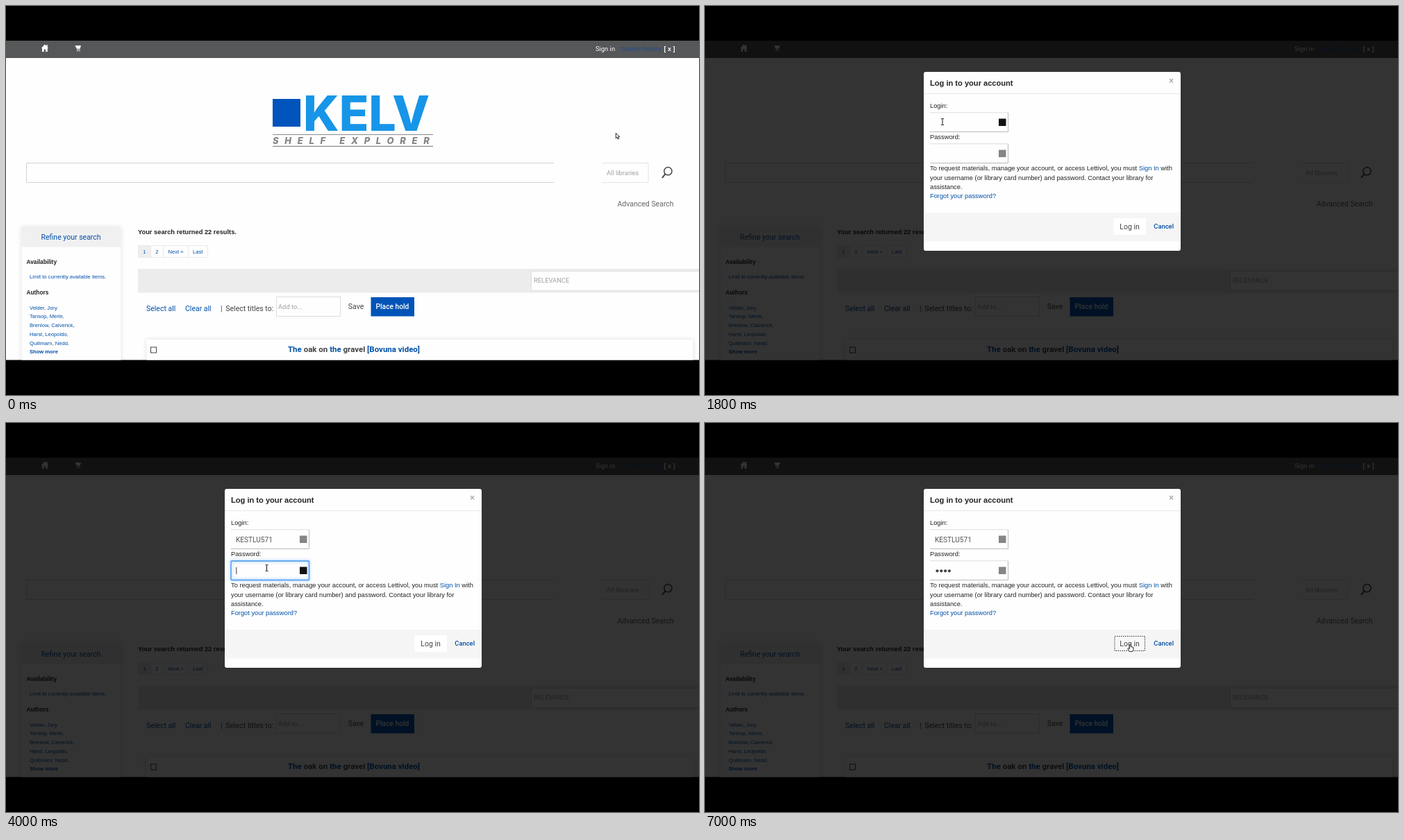
An HTML page for the animation above (8000 ms loop, 998 by 561 pixels).

```html
<!DOCTYPE html>
<html lang="en">
<head>
<meta charset="utf-8">
<title>Catalog sign-in</title>
<style>
html, body { margin: 0; width: 100%; height: 100%; overflow: hidden; background: #000; }
svg { display: block; width: 100%; height: 100%; }
text { font: 9.3px "Liberation Sans", Arial, sans-serif; fill: #222; }
.ui text, text.ui { font-family: Roboto, sans-serif; font-size: 10.5px; fill: #444; }
.b text, text.b { font-weight: 700; }
.s text { font-size: 7.6px; }
.link text, text.link, tspan.link { fill: #0050a8 !important; }
.hint text { font-size: 9.4px; fill: #a0a0a0; }
.box { fill: #fefefe; stroke: #dedede; }
.focus { fill: none; stroke: #4a9af0; stroke-width: 1.4; filter: drop-shadow(0 0 2px #66b0ff); }
.card { fill: #fefefe; filter: drop-shadow(0 0 3px #0002); }
</style>
</head>
<body>
<svg viewBox="0 0 998 561">
  <defs>
    <path id="arrow" d="M.3.3V7.8L2 6.2 3.3 9 4.6 8.5 3.4 5.8H5.8Z" fill="#fff" stroke="#111" stroke-width=".9"/>
    <path id="hand" d="M-.6 1.4Q.3.2 1.2 1.4V4.6L4.8 5.4V9.2L3.8 11.6H-.8L-3.2 7.6Q-3 6.2-1.6 7.2L-.6 8Z" fill="#fff" stroke="#111" stroke-width=".9"/>
    <path id="beam" d="M-2-4.5H-.6L0-4 .6-4.5H2M0-4V4M-2 4.5H-.6L0 4 .6 4.5H2" fill="none" stroke="#111"/>
    <path id="dash" d="M-2-4.5H2" stroke="#111" stroke-width="1.2"/>
    <clipPath id="view"><path d="M0 50H998V510.6H0Z"/></clipPath>
  </defs>
  <rect width="998" height="561"/>

  <g clip-path="url(#view)">
    <rect y="50" width="998" height="461" fill="#fefefe"/>
    <rect y="50" width="998" height="25" fill="#555759"/>
    <path d="M50.8 61 55.8 55.3 58.2 57.8V56H59.8V59.4L61.2 61H59.8V66H57V62.5H54.6V66H52V61Z" fill="#fff"/>
    <path d="M99.5 57H108L106.6 61.8H101.8Z" fill="#fff"/>
    <path d="M102 63.2H106.6M102 65H103.4M105.4 65H106.8" stroke="#fff"/>
    <text class="ui" x="849" y="64.5" style="font-size:9.4px;fill:#fff">Sign in</text>
    <text x="885" y="64.5" style="font-size:9.2px;fill:#1d4c94">Search history</text>
    <text class="b" x="947.5" y="64.5" style="font-size:9px;fill:#fff">[ x ]</text>

    <rect x="384" y="134" width="40" height="40" fill="#0054bb"/>
    <text x="428" y="180" style="font:800 70px Inter,sans-serif;fill:#1795e8">KELV</text>
    <path d="M384 185.5H615M384 202.3H615" stroke="#8a8a8a" stroke-width="1.2"/>
    <text x="384" y="198.5" style="font:italic 800 13px Inter,sans-serif;fill:#858585;letter-spacing:8.7px">SHELF EXPLORER</text>

    <path d="M789 226.5H29.5V254.5H789" fill="none" stroke="#d2d2d2"/>
    <path d="M858 226.5H925V254.5H858" fill="none" stroke="#e4e4e4"/>
    <g class="ui hint">
      <text x="865" y="244">All libraries</text>
    </g>
    <path d="M949.5 242 945 248" stroke="#444" stroke-width="2"/>
    <circle cx="953.4" cy="238.2" r="5.6" fill="none" stroke="#444" stroke-width="1.5"/>
    <text class="ui" x="880.5" y="289" style="fill:#666">Advanced Search</text>

    <rect class="card" x="22.5" y="319" width="143" height="210"/>
    <rect x="22.5" y="319" width="143" height="28.5" fill="#f0f0f1"/>
    <text class="ui link" x="50.5" y="336.8">Refine your search</text>
    <g class="b">
      <text x="29.5" y="371.8" style="font-size:8.3px">Availability</text>
      <text x="29.5" y="416" style="font-size:8.3px">Authors</text>
    </g>
    <g class="s link">
      <text x="34" y="393">Limit to currently available items.</text>
      <text x="34" y="437.5">Velder, Jory</text>
      <text x="34" y="450.2">Tansop, Merle,</text>
      <text x="34" y="463">Brenlow, Calverick,</text>
      <text x="34" y="475.8">Harst, Leopoldo,</text>
      <text x="34" y="488.5">Quillmarn, Nedd.</text>
      <text class="b" x="34" y="501">Show more</text>
    </g>

    <text class="b" x="190" y="328.5">Your search returned 22 results.</text>
    <rect x="190" y="346" width="18.5" height="17" fill="#eeeef0"/>
    <path d="M190.5 345.5H290.5V362.5H190.5ZM208.5 346V362M226.5 346V362M262.5 346V362" fill="none" stroke="#eaeaea"/>
    <g class="s link">
      <text x="197.3" y="357">1</text>
      <text x="215.3" y="357">2</text>
      <text x="233.5" y="357">Next »</text>
      <text x="269" y="357">Last</text>
    </g>

    <rect x="190" y="379" width="808" height="34.5" fill="#ececec"/>
    <rect class="box" x="756.5" y="382.5" width="250" height="28"/>
    <rect class="box" x="389.5" y="419.5" width="92" height="28"/>
    <g class="ui hint">
      <text x="760" y="399">RELEVANCE</text>
      <text x="392" y="437">Add to...</text>
    </g>
    <g class="ui">
      <text class="link" x="202" y="439.5">Select all</text>
      <text class="link" x="258" y="439.5">Clear all</text>
      <text x="309" y="439.5">|</text>
      <text x="316.3" y="439.5">Select titles to:</text>
      <text x="492.8" y="437.3">Save</text>
      <rect x="525.5" y="420" width="62.5" height="27.5" fill="#0054b8"/>
      <text x="532.5" y="437.3" style="font-weight:500;font-size:10.2px;fill:#fff">Place hold</text>
    </g>

    <rect class="card" x="202.5" y="481" width="787" height="50"/>
    <rect x="208.5" y="492" width="8" height="8" fill="#fff" stroke="#444"/>
    <g class="ui b">
      <text x="406" y="498.8" style="font-size:11.5px"><tspan class="link">The</tspan> oak on <tspan class="link">the</tspan> gravel <tspan class="link">[Bovuna video]</tspan></text>
    </g>
  </g>

  <g id="modal">
    <rect y="50" width="998" height="461" opacity=".8"/>
    <rect x="315" y="95" width="370" height="258" rx="3" fill="#fefefe"/>
    <path d="M315 126.5H685" stroke="#e8e8e8"/>
    <text class="b" x="324" y="114.5" style="font-size:11.1px">Log in to your account</text>
    <text class="b" x="668" y="112" style="font-size:12px;fill:#aaa">×</text>
    <text x="324" y="146.8">Login:</text>
    <text x="324" y="191.8">Password:</text>
    <g fill="none">
      <path d="M324 153.8H436.5M324 198.8H436.5" stroke="#ddd"/>
      <path d="M324 181.5H436.5V154M324 226.5H436.5V199" stroke="#bbb"/>
    </g>
    <rect class="focus" id="focus" x="324" y="154" width="112.5" height="27.5" rx="1"/>
    <rect id="icon1" x="423" y="162.5" width="10.5" height="10.5"/>
    <rect id="icon2" x="423" y="207.5" width="10.5" height="10.5"/>
    <text class="ui" id="login" x="331" y="171.5" style="font-size:10.1px;fill:#555"></text>
    <g id="dots" fill="#444">
      <circle cx="334.5" cy="213.3" r="2.1"/><circle cx="340.3" cy="213.3" r="2.1"/><circle cx="346.1" cy="213.3" r="2.1"/><circle cx="351.9" cy="213.3" r="2.1"/>
    </g>
    <path id="caret" d="M0 0V10" stroke="#222" stroke-width=".9"/>
    <text x="324" y="237.3">To request materials, manage your account, or access Lettivol, you must <tspan class="link">Sign In</tspan> with</text>
    <text x="324" y="250.5">your username (or library card number) and password. Contact your library for</text>
    <text x="324" y="263.5">assistance.</text>
    <text class="link" x="324" y="276.8">Forgot your password?</text>
    <rect x="315" y="298" width="370" height="41.5" fill="#f5f5f5"/>
    <rect id="button" x="588.5" y="306" width="46.5" height="24"/>
    <rect id="outline" x="590" y="307.5" width="43.5" height="21" fill="none" stroke="#222" stroke-dasharray="1.5 1.5"/>
    <g class="ui">
      <text x="597.3" y="322">Log in</text>
      <text class="link" x="646.3" y="320.5" style="font-weight:500;font-size:9.4px">Cancel</text>
    </g>
  </g>
  <use id="pointer"/>
</svg>

<script>
const LOOP = 8000, STEP = 200, USER = "KESTLU571";
// pointer stops: time, x, y
const stops = [
  [0, 878, 183], [800, 862, 63], [1200, 862, 63], [1800, 342, 167], [3000, 342, 167],
  [3400, 362, 189], [3800, 375.5, 209], [5000, 375.5, 209], [5600, 568, 264], [6200, 612, 318]
];
const el = id => document.getElementById(id);
const set = (id, attrs) => { for (const k in attrs) el(id).setAttribute(k, attrs[k]); };
const show = (id, on) => set(id, { visibility: on ? "visible" : "hidden" });
const clamp = (v, max) => Math.max(0, Math.min(max, v));

function pointerAt(t) {
  const i = stops.findIndex(s => s[0] > t);
  if (i < 0) return stops[stops.length - 1].slice(1);
  const [t0, x0, y0] = stops[i - 1], [t1, x1, y1] = stops[i];
  const u = (t - t0) / (t1 - t0), e = u * u * (3 - 2 * u);
  return [x0 + (x1 - x0) * e, y0 + (y1 - y0) * e];
}

function draw(t) {
  const [x, y] = pointerAt(t), open = t >= 1000;
  const over = (l, top, r, b) => x >= l && x <= r && y >= top && y <= b;
  const inLogin = open && over(324, 154, 437, 182);
  const inPass = open && over(324, 199, 437, 227);
  const inButton = open && over(588, 306, 635, 330);
  const onLink = open ? inButton || over(324, 183, 368, 196) : over(849, 55, 877, 70);
  const typingLogin = t >= 2400 && t <= 3000, typingPass = t >= 4600 && t <= 5000;

  const kind = typingPass ? "dash" : inLogin || inPass ? "beam" : onLink ? "hand" : "arrow";
  set("pointer", { href: "#" + kind, transform: `translate(${x} ${y})` });
  show("pointer", !typingLogin);

  el("modal").style.display = open ? "" : "none";
  set("icon1", { fill: inLogin ? "#111" : "#858585" });
  set("icon2", { fill: inPass ? "#111" : "#858585" });

  const passFocus = t >= 4000;
  show("focus", t >= 2200 && t < 7000);
  set("focus", { y: passFocus ? 199 : 154 });

  el("login").textContent = USER.slice(0, clamp((t - 2200) / 100, USER.length));
  const typed = clamp((t - 4400) / 200, 4);
  [...el("dots").children].forEach((dot, i) => dot.setAttribute("opacity", i < typed ? 1 : 0));

  const caretX = passFocus ? 331.8 + typed * 5.8 : 331.5 + el("login").getComputedTextLength();
  set("caret", { transform: `translate(${caretX} ${passFocus ? 208 : 163})` });
  show("caret", t >= 2200 && t <= 3000 || t >= 4000 && t <= 5200);

  set("button", { fill: inButton ? "#f8f8f8" : "#fff" });
  show("outline", t >= 7000);
}

const start = performance.now();
function tick() {
  const t = (performance.now() - start) % LOOP;
  draw(Math.floor(t / STEP) * STEP);
  requestAnimationFrame(tick);
}
tick();
</script>
</body>
</html>
```
